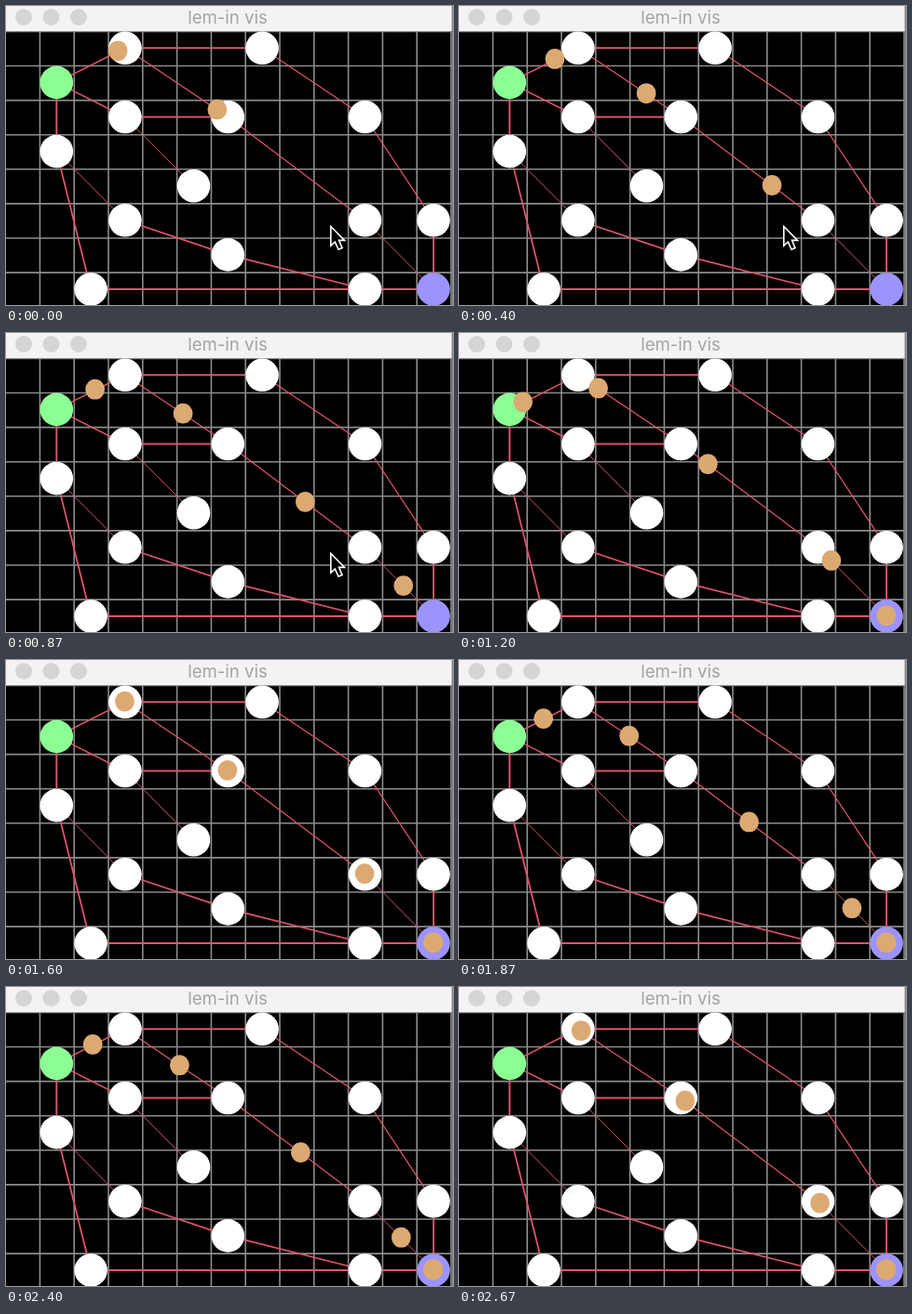
Recreate the animation shown at these times as an HTML page. Size 480 px wide and 322 px high, loop 2740 ms.

```html
<!DOCTYPE html>
<html lang="en">
<head>
<meta charset="utf-8">
<title>lem-in vis</title>
<style>
  html, body { margin: 0; width: 100%; height: 100%; overflow: hidden; background: #000; }
  svg { display: block; width: 480px; height: 322px; }
  #title { font: 400 18.6px Inter, Roboto, sans-serif; fill: #a5a3a5; text-anchor: middle; }
  #grid line { stroke: #8c8c8c; stroke-width: 1.6; }
  #links line { stroke: #de546c; }
  #rooms circle { fill: #fff; }
  #rooms .start { fill: #8cff94; }
  #rooms .end { fill: #9c94fc; }
  #ants ellipse { fill: #dda973; }
</style>
</head>
<body>
<svg viewBox="0 0 480 322">
  <rect width="480" height="322"/>
  <g id="grid"></g>
  <g id="links"></g>
  <g id="rooms"></g>
  <g id="ants"></g>
  <rect width="480" height="27" fill="#f5f2f5"/>
  <g id="buttons" fill="#d6d4d6">
    <circle cx="19" cy="12" r="9"/>
    <circle cx="48.5" cy="12" r="9"/>
    <circle cx="78" cy="12" r="9"/>
  </g>
  <text id="title" x="238" y="19">lem-in vis</text>
  <rect x="478.6" width="1.4" height="322" fill="#808080"/>
  <path id="cursor" d="M348.8 237.5V258.2L353.3 254L357 262.3L361 260.6L357.5 252.4H363.5Z"
        fill="#000" stroke="#fff" stroke-width="1.6"/>
</svg>
<script>
const LOOP = 2740;
const TICKS_PER_TURN = 31;
const FIRST_TICK = 27;
const ANTS = 7;
const CURSOR_GONE = 1070;

// Rooms in grid cells
const rooms = {
  start: [0, 1], a: [2, 0], b: [5, 2], c: [9, 5], end: [11, 7],
  d: [6, 0], e: [9, 2], f: [11, 5], g: [2, 2], h: [4, 4],
  i: [0, 3], j: [2, 5], k: [5, 6], l: [1, 7], m: [9, 7]
};
const links = ['start a', 'a b', 'b c', 'c end', 'a d', 'd e', 'e f', 'f end',
  'start g', 'g b', 'g h', 'start i', 'i j', 'j k', 'k m', 'i l', 'l m', 'm end'];
const route = ['start', 'a', 'b', 'c', 'end'].map(place);
const cursor = document.getElementById('cursor');

function place(name) {
  const [col, row] = rooms[name];
  return [54.3 + col * 36.8, 45.3 + row * 37.1];
}

function add(parent, tag, attrs) {
  const el = document.createElementNS('http://www.w3.org/2000/svg', tag);
  for (const key in attrs) el.setAttribute(key, attrs[key]);
  return document.getElementById(parent).appendChild(el);
}

function line(parent, [x1, y1], [x2, y2], extra) {
  return add(parent, 'line', { x1, y1, x2, y2, ...extra });
}

function show(el, on) {
  el.setAttribute('visibility', on ? 'visible' : 'hidden');
}

for (let n = 0; n < 13; n++) {
  const x = 36.4 + n * 36.8;
  line('grid', [x, 27], [x, 322]);
}
for (let n = 0; n < 8; n++) {
  const y = 27.4 + n * 37.1;
  line('grid', [0, y], [480, y]);
}

// Pixel-stepped lines get thinner as they near 45 degrees
for (const link of links) {
  const [p, q] = link.split(' ').map(place);
  const dx = Math.abs(q[0] - p[0]), dy = Math.abs(q[1] - p[1]);
  const lean = Math.max(dx, dy) / Math.hypot(dx, dy);
  line('links', p, q, { 'stroke-width': 1.9 * lean ** 2 });
}

for (const name in rooms) {
  const [cx, cy] = place(name);
  add('rooms', 'circle', { cx, cy, r: 17.8, class: name });
}

const ants = Array.from({ length: ANTS }, () => add('ants', 'ellipse', { rx: 10.4, ry: 10.9 }));

function draw(ms) {
  // 15 pictures a second, four ticks each
  const step = Math.floor(Math.floor(ms / 10) * 0.15 + 0.06);
  const tick = FIRST_TICK + 4 * step;
  const turn = Math.floor(tick / TICKS_PER_TURN);
  const part = tick % TICKS_PER_TURN / (TICKS_PER_TURN - 1);

  show(cursor, ms < CURSOR_GONE);
  ants.forEach((ant, n) => {
    const leg = turn + 1 - n;
    show(ant, leg >= 0);
    if (leg < 0) return;
    const p = route[Math.min(leg, 4)], q = route[Math.min(leg + 1, 4)];
    ant.setAttribute('cx', p[0] + (q[0] - p[0]) * part - 0.4);
    ant.setAttribute('cy', p[1] + (q[1] - p[1]) * part - 0.7);
  });
}

const begin = performance.now();
function frame() {
  draw((performance.now() - begin) % LOOP);
  requestAnimationFrame(frame);
}
draw(0);
requestAnimationFrame(frame);
</script>
</body>
</html>
```
